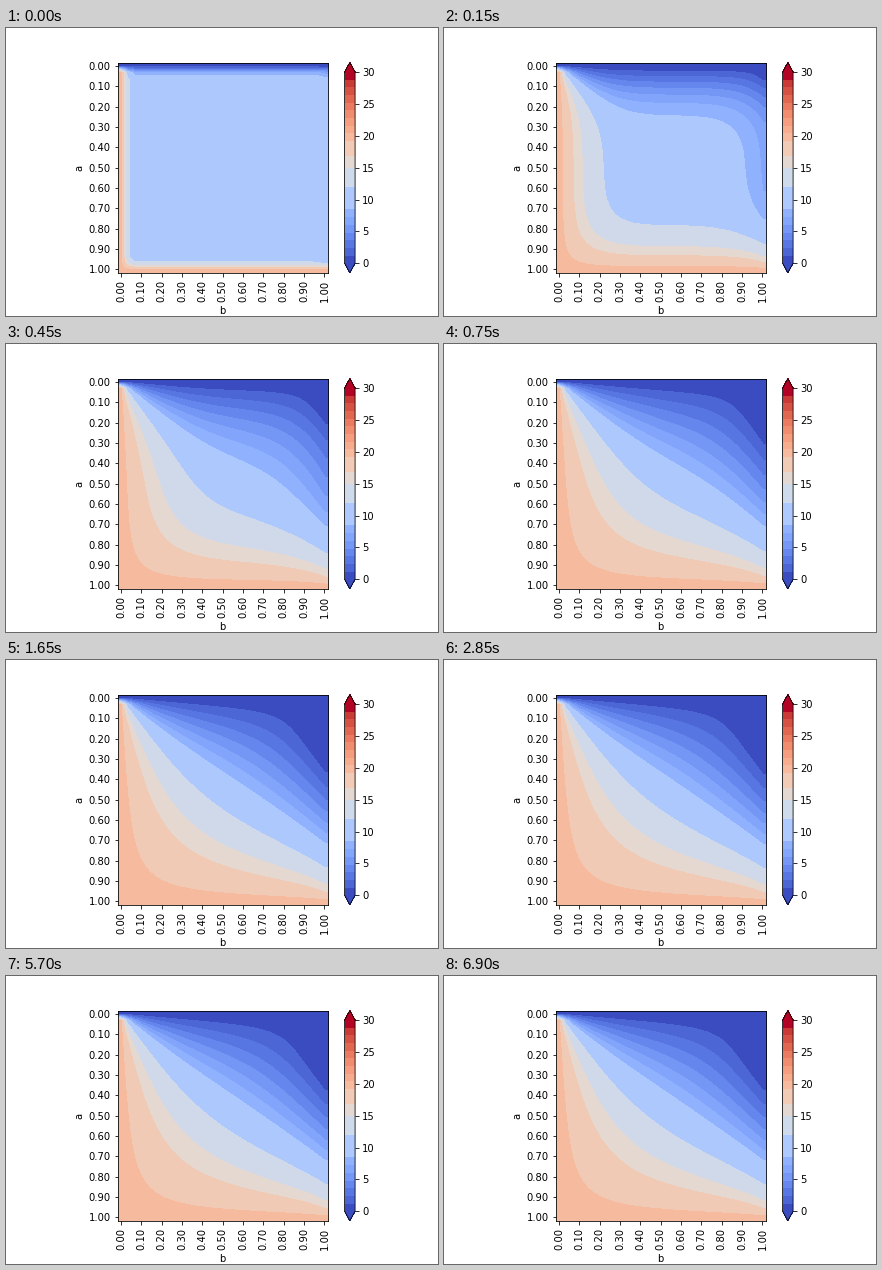
A matplotlib script that plays this animation: 432 px wide and 288 px high, repeating every 7200 ms.

```python
import numpy as np
import matplotlib.pyplot as plt
from matplotlib.animation import FuncAnimation
from matplotlib.colors import ListedColormap

N = 31                # grid points per side
DX = 1 / (N - 1)
RATE = 0.25           # dt / dx**2
FLUX = 20             # heat drawn out through the right side
FRAMES, INTERVAL, STEPS = 48, 150, 50
VMAX = 30


def banded_cmap():
    """Coolwarm split into flat bands over 0..VMAX."""
    edges = np.concatenate([np.arange(7) * 1.2, [8.5, 12, 15, 16.8],
                            np.arange(16, 26) * 1.2])
    tones = (edges[:-1] + edges[1:]) / 2
    tones[0], tones[-1] = 0, VMAX
    values = (np.arange(600) + 0.5) * VMAX / 600
    band = np.searchsorted(edges, values, side="right") - 1
    return ListedColormap(plt.get_cmap("coolwarm")(tones[band] / VMAX))


def set_edges(u):
    u[:, -1] = u[:, -2] - FLUX * DX
    u[:, 0] = 20
    u[-1, :] = 20
    u[0, :] = 0


def step(u):
    core = u[1:-1, 1:-1]
    around = u[:-2, 1:-1] + u[2:, 1:-1] + u[1:-1, :-2] + u[1:-1, 2:]
    u[1:-1, 1:-1] = core + RATE * (around - 4 * core)
    set_edges(u)


def solve():
    u = np.full((N, N), 10.0)
    set_edges(u)
    step(u)
    fields = [u.copy()]
    while len(fields) < FRAMES:
        for _ in range(STEPS):
            step(u)
        fields.append(u.copy())
    return fields


fields = solve()

plt.rcParams["font.family"] = "DejaVu Sans"
fig, ax = plt.subplots(figsize=(6, 4), dpi=72)
fig.subplots_adjust(left=0.125, right=0.9, bottom=0.15, top=0.88)

image = ax.imshow(fields[0], cmap=banded_cmap(), vmin=0, vmax=VMAX,
                  interpolation="bilinear", interpolation_stage="data")
fig.colorbar(image, ax=ax, extend="both", ticks=range(0, VMAX + 1, 5))

ticks = np.arange(0, N, 3)
labels = [f"{t * DX:.2f}" for t in ticks]
ax.set_xticks(ticks, labels, rotation=90)
ax.set_yticks(ticks, labels)
ax.set_xlabel("b")
ax.set_ylabel("a")


def update(i):
    image.set_data(fields[i])
    return (image,)


anim = FuncAnimation(fig, update, frames=FRAMES, interval=INTERVAL,
                     repeat=True, repeat_delay=0)
plt.show()
```
